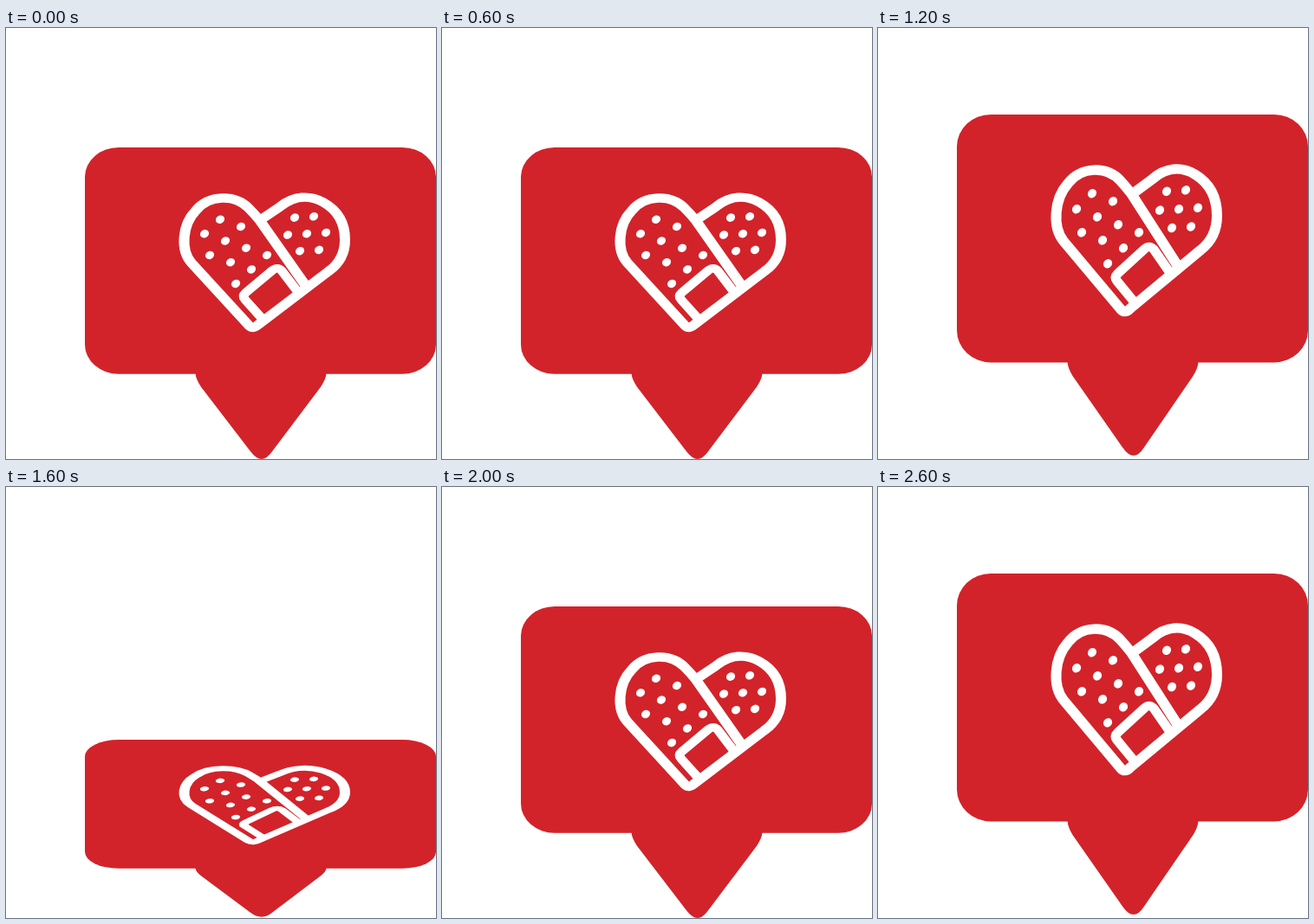
These frames come from a looping animation (496x498 px, 2.7 s). An HTML page with a canvas:

```html
<!DOCTYPE html>
<html lang="en">
<head>
<meta charset="utf-8">
<title>Bouncing heart bubble</title>
<style>
html, body { margin: 0; width: 100%; height: 100%; overflow: hidden; background: #fff; }
canvas { display: block; }
</style>
</head>
<body>
<canvas id="stage" width="496" height="498"></canvas>
<script>
const ctx = document.getElementById("stage").getContext("2d");
const LOOP = 2700, STEP = 100, CYCLE = 14;
const TOP = 6, HEIGHT = 415;

// Each pose gives the top and bottom edge of the bubble
const land = { top: 138, bottom: 498 };
const flat = { top: 369, bottom: 496 };
const peak = { top: 6, bottom: 421 };
const rest = { top: 100, bottom: 494 };

const easeOut = t => 1 - (1 - t) ** 1.585;
const smooth = t => t * t * (3 - 2 * t);

function blend(a, b, t) {
  const mix = key => a[key] + (b[key] - a[key]) * t;
  return { top: mix("top"), bottom: mix("bottom") };
}

function poseAt(step) {
  if (step < 4) return blend(land, flat, easeOut(step / 4));
  if (step < 6) return blend(flat, land, smooth((step - 4) / 2));
  if (step < 9) return blend(land, peak, smooth(Math.min(1, (step - 6) / 2)));
  if (step < 12) return blend(peak, land, smooth((step - 9) / 2));
  return rest;
}

const bubble = new Path2D();
bubble.roundRect(91, 6, 405, 301.7, 39);

const tail = new Path2D(`M218.5 300 V307 Q219 315 225 325 L282 411
  Q295 431 307 411 L363 325 Q369 315 369.5 307 V300 Z`);

const outline = new Path2D(`M280 243 L214 160 C201 143 203 109 219 90
  C234 69 264 68 280 87 Q286 94 292 102 L345 189
  M294 102 L316 85 C332 70 350 69 366 79 C383 90 391 107 391 129
  C391 149 383 162 372 171 L291 242 Q285 249 280 243`);

const pad = new Path2D("M297 236 L276 209 Q272 204 277 199 L307 170 Q313 164 318 170 L337 199");

// A slanted row of dots, from column a to column b
function dotRow(x, y, dx, dy, a, b) {
  for (let i = a; i <= b; i++) {
    ctx.beginPath();
    ctx.ellipse(x + i * dx, y + i * dy, 4.9, 5.7, 0.5, 0, Math.PI * 2);
    ctx.fill();
  }
}

function drawDots() {
  const leftRow = (row, a, b) => dotRow(247 - 18 * row, 102 + 19 * row, 24, 9.5, a, b);
  leftRow(0, 0, 1);
  leftRow(1, 0, 3);
  leftRow(2, 1, 3);
  leftRow(3, 3, 3);

  const rightRow = (row, a, b) => dotRow(347 - 8 * row, 121 + 23 * row, 22, -1.5, a, b);
  rightRow(-1, -1, 0);
  rightRow(0, -1, 1);
  rightRow(1, 0, 1);
}

function drawHeart() {
  ctx.strokeStyle = ctx.fillStyle = "#fff";
  ctx.lineCap = ctx.lineJoin = "round";
  ctx.lineWidth = 12;
  ctx.stroke(outline);
  ctx.lineWidth = 11;
  ctx.stroke(pad);
  drawDots();
}

function draw(time) {
  const step = Math.floor((time % LOOP) / STEP) % CYCLE;
  const { top, bottom } = poseAt(step);
  const scale = (bottom - top) / HEIGHT;
  ctx.setTransform(1, 0, 0, 1, 0, 0);
  ctx.fillStyle = "#fff";
  ctx.fillRect(0, 0, 496, 498);
  ctx.setTransform(1, 0, 0, scale, 0, top - TOP * scale);
  ctx.fillStyle = "#d2232a";
  ctx.fill(bubble);
  ctx.fill(tail);
  drawHeart();
}

const start = performance.now();
function tick() {
  draw(performance.now() - start);
  requestAnimationFrame(tick);
}
tick();
</script>
</body>
</html>
```
